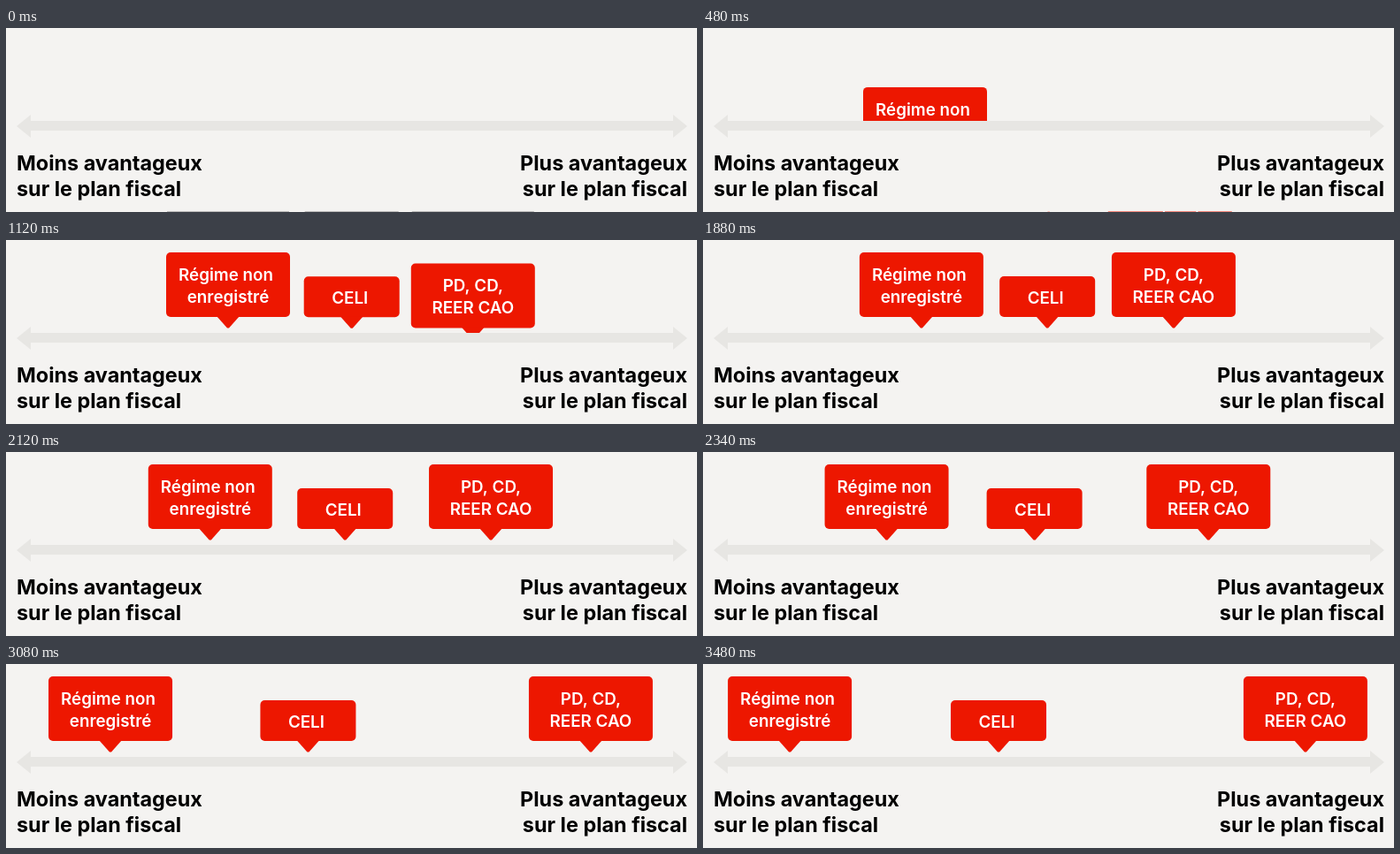
Animation of 781x208 px, one loop 3.6 s. Source, as an HTML page with a canvas:

```html
<!DOCTYPE html>
<html lang="fr">
<head>
<meta charset="utf-8">
<title>Avantage fiscal</title>
<style>
  html, body { margin: 0; width: 100%; height: 100%; overflow: hidden; background: #f4f3f1; }
  canvas { display: block; }
</style>
</head>
<body>
<canvas id="stage" width="781" height="208"></canvas>
<script>
const ctx = document.getElementById('stage').getContext('2d');
const LOOP = 3600;
const BG = '#f4f3f1', BAR = '#e7e6e3', RED = '#ed1700', HINT = '#bab9b8';
const RISE = 193, BOTTOM = 87, BAR_TOP = 105;
const SPREAD_START = 1690, SPREAD_TIME = 1820;

// Text lines: [string, offset from the centre, baseline]
const boxes = [
  { x: 181, endX: 28, top: 14, width: 140, start: 0, time: 930,
    lines: [['Régime non', -2.5, 46], ['enregistré', 0, 71]] },
  { x: 336.7, endX: 280, top: 41, width: 108, start: 208, time: 940,
    lines: [['CELI', -2, 72]] },
  { x: 457.8, endX: 611, top: 14, width: 140, start: 374, time: 970,
    lines: [['PD, CD,', 0, 46], ['REER CAO', 0, 71]] }
];

const clamp = v => Math.min(1, Math.max(0, v));
const sineOut = u => Math.sin(u * Math.PI / 2);
const sineInOut = u => (1 - Math.cos(u * Math.PI)) / 2;

function polygon(...points) {
  ctx.beginPath();
  points.forEach(([x, y]) => ctx.lineTo(x, y));
  ctx.fill();
}

function drawBox(box, t) {
  const spread = sineInOut(clamp((t - SPREAD_START) / SPREAD_TIME));
  const rise = sineOut(clamp((t - box.start) / box.time));
  const mid = box.width / 2;
  ctx.save();
  ctx.translate(box.x + (box.endX - box.x) * spread, RISE * (1 - rise));
  ctx.fillStyle = RED;
  ctx.beginPath();
  ctx.roundRect(0, box.top, box.width, BOTTOM - box.top, 5);
  ctx.fill();
  polygon([mid - 13, BOTTOM - 1], [mid + 13, BOTTOM - 1], [mid + 1, 99.5], [mid - 1, 99.5]);
  ctx.fillStyle = '#fff';
  ctx.font = '600 18.8px Inter, sans-serif';
  ctx.textAlign = 'center';
  for (const [text, dx, y] of box.lines) ctx.fillText(text, mid + dx, y);
  ctx.restore();
}

function drawScale() {
  ctx.fillStyle = BAR;
  ctx.fillRect(27, BAR_TOP, 728, 11);
  polygon([12, 111], [28, 98], [28, 124]);
  polygon([770, 111], [754, 98], [754, 124]);
  ctx.fillStyle = '#000';
  ctx.font = '700 23.4px Inter, sans-serif';
  for (const [align, x, word] of [['left', 12, 'Moins'], ['right', 770, 'Plus']]) {
    ctx.textAlign = align;
    ctx.fillText(word + ' avantageux', x, 161);
    ctx.fillText('sur le plan fiscal', x, 190);
  }
}

function draw(t) {
  ctx.fillStyle = BG;
  ctx.fillRect(0, 0, 781, 208);
  if (t < 40) {
    ctx.fillStyle = HINT;
    for (const box of boxes) ctx.fillRect(box.x + 1, 207, box.width - 2, 1);
  } else {
    for (const box of boxes) drawBox(box, t);
    // Hides the boxes until they clear the bar
    ctx.fillStyle = BG;
    ctx.fillRect(0, BAR_TOP, 781, 102.5);
  }
  drawScale();
}

const begin = performance.now();
function frame() {
  draw((performance.now() - begin) % LOOP);
  requestAnimationFrame(frame);
}
frame();
</script>
</body>
</html>
```
